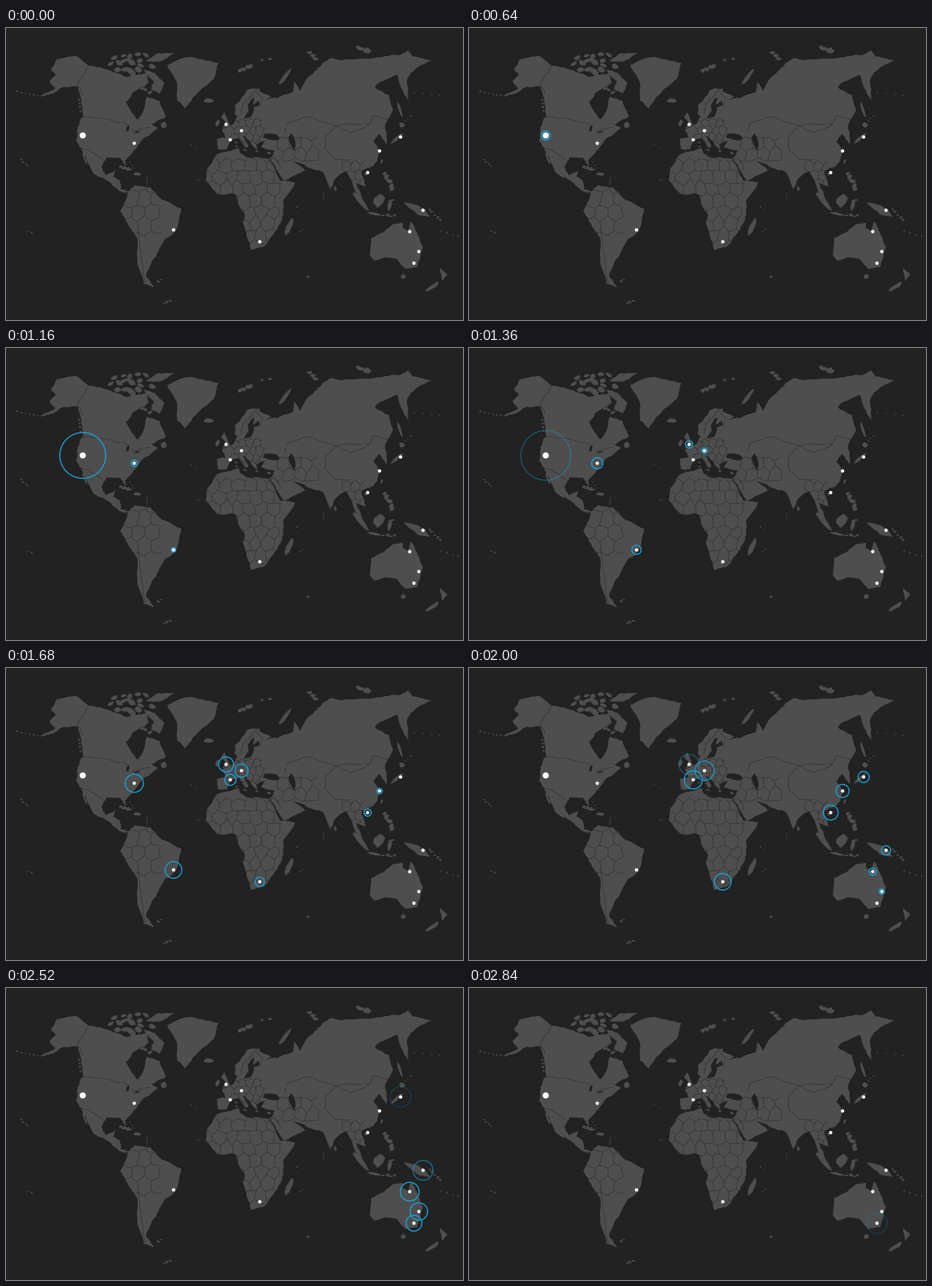
Animation of 652 by 418 pixels, one loop 2880 ms. Source, as a matplotlib script:

```python
import numpy as np
import matplotlib.pyplot as plt
from matplotlib.animation import FuncAnimation
from matplotlib.collections import LineCollection, PolyCollection
from matplotlib.patches import Circle

W, H, DPI = 652, 418, 64
STEP, FRAMES = 40, 72
PX = 72 / DPI
SEA, LAND, BLUE = "#222222", "#4e4e4e", "#12a5dc"

rng = np.random.default_rng(4)
lands, waters, borders = [], [], []


def rough(xy, closed=True, depth=3):
    """Midpoint displacement: turns a few key points into a coastline."""
    pts = np.reshape(xy, (-1, 2)).astype(float)
    if closed:
        pts = np.vstack([pts, pts[:1]])
    for _ in range(depth):
        d = np.diff(pts, axis=0)
        size = np.minimum(0.09 * np.hypot(*d.T), 1.2)
        mid = pts[:-1] + d / 2 + size[:, None] * rng.uniform(-1, 1, d.shape)
        out = np.empty((len(pts) + len(mid), 2))
        out[::2], out[1::2] = pts, mid
        pts = out
    return pts


def land(*xy):
    lands.append(rough(xy))


def border(*xy):
    borders.append(rough(xy, closed=False))


def blob(x, y, w, h, tilt=0):
    a = np.linspace(0, 2 * np.pi, 11)[:-1]
    r = rng.uniform(0.8, 1.15, 10) / 2
    u, v = w * r * np.cos(a), h * r * np.sin(a)
    c, s = np.cos(np.radians(tilt)), np.sin(np.radians(tilt))
    return np.column_stack([x + u * c - v * s, y + u * s + v * c])


def island(*shape):
    lands.append(blob(*shape))


def lake(*shape):
    waters.append(blob(*shape))


def chain(x0, y0, x1, y1, n, size):
    """A row of n small islands between two points."""
    for x, y in np.linspace((x0, y0), (x1, y1), n):
        w, h = size * rng.uniform([0.8, 0.45], [1.3, 0.8])
        dx, dy = rng.uniform(-0.2, 0.2, 2) * size
        island(x + dx, y + dy, w, h, rng.uniform(-40, 40))


def mesh(x0, y0, x1, y1, step):
    """Uneven honeycomb of borders; over the sea it cannot be seen."""
    x, y = np.meshgrid(np.arange(x0, x1, step / 2), np.arange(y0, y1, step))
    rows, cols = x.shape
    r, c = np.indices(x.shape)
    x = x + rng.uniform(-0.15, 0.15, x.shape) * step
    y = y + (0.16 * (-1.0) ** (r + c) + rng.uniform(-0.2, 0.2, x.shape)) * step
    for i in range(rows):
        border(*np.column_stack([x[i], y[i]]).ravel())
        if i + 1 < rows:
            for j in range(i % 2, cols, 2):
                border(x[i, j], y[i, j], x[i + 1, j], y[i + 1, j])


# North America
land(64, 60, 72, 45, 100, 40, 118, 54, 146, 60, 172, 70, 200, 64, 204, 78,
     180, 93, 171, 106, 187, 131, 196, 118, 201, 98, 219, 104, 228, 127,
     208, 138, 217, 143, 196, 158, 181, 177, 170, 190, 171, 199, 163, 186,
     144, 185, 136, 199, 143, 211, 156, 204, 153, 213, 162, 218, 164, 231,
     177, 234, 168, 236, 147, 220, 126, 209, 110, 178, 100, 160, 102, 142,
     110, 126, 107, 100, 103, 84, 82, 84, 66, 94, 48, 98, 70, 87, 62, 76,
     71, 66)
land(230, 53, 258, 42, 303, 50, 297, 72, 268, 98, 256, 115, 244, 104, 243, 76)
land(196, 60, 212, 64, 226, 78, 219, 94, 207, 88, 211, 77)
land(200, 47, 216, 36, 241, 36, 220, 48)
island(112, 186, 3, 18, -20)
island(225, 139, 9, 9)
island(289, 104, 14, 7)
chain(149, 50, 190, 46, 5, 11)
chain(160, 60, 190, 60, 4, 13)
chain(156, 42, 198, 38, 5, 9)
chain(194, 54, 208, 54, 2, 11)
chain(194, 86, 205, 93, 3, 6)
chain(104, 102, 107, 119, 4, 4)
chain(16, 91, 46, 97, 6, 3)
chain(22, 189, 31, 198, 4, 3)
chain(163, 198, 177, 204, 4, 6)
island(187, 209, 11, 5, 5)
chain(177, 192, 182, 200, 3, 2.5)
chain(202, 212, 201, 225, 5, 2.5)

# South America
land(173, 236, 185, 225, 206, 228, 223, 246, 250, 259, 242, 291, 228, 301,
     216, 322, 209, 332, 200, 356, 211, 371, 197, 367, 188, 340, 187, 300,
     176, 285, 163, 262)
chain(217, 363, 221, 361, 2, 4)
chain(226, 394, 234, 390, 3, 4)

# Europe and Siberia
land(360, 90, 378, 98, 370, 104, 388, 100, 410, 90, 411, 77, 420, 90, 428, 74,
     440, 62, 452, 50, 464, 43, 480, 46, 510, 44, 545, 40, 564, 38, 573, 32,
     580, 41, 607, 46, 592, 53, 577, 64, 572, 74, 574, 104, 563, 84, 558, 67,
     534, 77, 526, 85, 546, 96, 552, 116, 541, 138, 520, 160, 400, 160,
     368, 162, 357, 167, 358, 174, 352, 169, 342, 156, 337, 154, 346, 168,
     343, 172, 332, 157, 321, 160, 315, 174, 302, 173, 301, 158, 313, 157,
     308, 145, 325, 137, 333, 123, 337, 131, 350, 127, 354, 113, 362, 110)
land(326, 122, 327, 110, 345, 88, 362, 87, 364, 101, 352, 110, 354, 99,
     345, 110, 346, 119, 338, 131, 328, 125)
land(309, 143, 313, 135, 307, 127, 312, 121, 320, 140)
island(302, 136, 6, 10, 15)
island(398, 70, 28, 6, -55)
island(562, 117, 4, 27, -20)
chain(334, 61, 350, 54, 4, 8)
chain(366, 46, 376, 45, 2, 6)
chain(433, 36, 440, 43, 3, 8)
chain(503, 30, 518, 34, 4, 9)
chain(329, 164, 329, 169, 2, 4)
chain(340, 174, 376, 179, 3, 5)
chain(264, 167, 272, 172, 3, 2)

# Southern Asia
land(364, 171, 368, 163, 400, 145, 530, 135, 541, 138, 543, 166, 532, 152,
     524, 163, 533, 178, 525, 196, 507, 206, 513, 227, 499, 222, 511, 250,
     499, 240, 492, 216, 485, 205, 470, 215, 463, 231, 452, 206, 428, 198,
     405, 185, 427, 204, 397, 219, 376, 187, 384, 175)
island(558, 158, 23, 5, -42)
island(565, 139, 8, 7)
island(536, 191, 3, 6, 20)
island(513, 209, 5, 4)
island(470, 230, 4, 7, -15)
chain(570, 133, 577, 126, 3, 2.5)
chain(583, 93, 619, 96, 4, 2.5)
chain(453, 236, 453, 244, 3, 2)
lake(379, 156, 28, 9, 10)
lake(409, 163, 9, 24, -15)
lake(174, 144, 4, 10, 10)
lake(187, 149, 9, 2.5, -15)

# Africa
land(301, 181, 332, 172, 335, 180, 350, 186, 375, 187, 391, 219, 413, 221,
     395, 249, 394, 274, 383, 293, 368, 313, 350, 318, 338, 278, 341, 268,
     331, 250, 328, 238, 302, 238, 285, 217, 288, 200)
island(404, 285, 8, 26, 20)
chain(273, 217, 276, 219, 2, 2.5)
chain(416, 256, 422, 258, 2, 2.5)
chain(419, 291, 423, 289, 2, 2.5)
island(431, 356, 5, 3, 20)

# Islands of the south east, Australia, New Zealand
island(506, 248, 34, 7, 50)
island(525, 266, 21, 4, 10)
island(532, 247, 15, 21, 25)
island(547, 254, 6, 16, 10)
island(550, 247, 10, 3, -10)
land(567, 250, 580, 252, 597, 259, 605, 271, 589, 268, 577, 259)
chain(542, 207, 552, 230, 6, 8)
chain(539, 268, 554, 269, 4, 5)
chain(604, 259, 619, 275, 5, 4)
chain(621, 291, 646, 298, 4, 3)
chain(32, 291, 37, 293, 2, 3)
land(519, 326, 521, 301, 537, 293, 552, 281, 566, 279, 566, 286, 574, 290,
     578, 277, 587, 295, 595, 314, 587, 342, 570, 345, 558, 331, 540, 328,
     525, 333)
island(567, 356, 8, 7)
land(619, 343, 630, 353, 622, 363, 621, 354)
island(609, 370, 24, 6, -35)

# Borders: long ones by key points, crowded regions by rule
border(118, 54, 102, 80, 109, 96)
border(110, 127, 150, 132, 173, 139)
border(180, 148, 206, 142)
border(104, 172, 118, 174, 138, 190)
border(189, 288, 191, 318, 199, 366)
border(335, 123, 337, 109, 357, 89, 366, 100, 362, 111)
border(398, 150, 400, 137, 432, 127, 470, 140, 492, 150, 518, 138, 524, 125,
       546, 132)
border(470, 140, 490, 137, 518, 138)
border(470, 140, 455, 156, 455, 172, 470, 188, 492, 189)
mesh(168, 234, 222, 305, 20)
mesh(288, 188, 396, 312, 17)
mesh(322, 132, 368, 170, 10)
mesh(386, 156, 452, 200, 17)
mesh(478, 192, 512, 232, 13)

HUB = (109.5, 153.8)
CITIES = [(183, 165), (239, 289), (314, 138), (336, 147), (320, 160),
          (362, 306), (516, 207), (533, 176), (563, 156), (595, 261),
          (576, 291.5), (589, 320), (582, 336.7)]

fig = plt.figure(figsize=(W / DPI, H / DPI), dpi=DPI, facecolor=SEA)
ax = fig.add_axes([0, 0, 1, 1])
ax.set_xlim(0, W)
ax.set_ylim(H, 0)
ax.axis("off")
ax.add_collection(PolyCollection(lands, facecolors=LAND, linewidths=0, zorder=1))
ax.add_collection(LineCollection(borders, colors=SEA, linewidths=0.5 * PX,
                                 zorder=2))
ax.add_collection(PolyCollection(waters, facecolors=SEA, linewidths=0, zorder=3))

rings = []
for i, spot in enumerate([HUB] + CITIES):
    ring = Circle(spot, 1, fill=False, ec=BLUE, lw=1.5 * PX, zorder=4)
    ax.add_patch(ring)
    rings.append(ring)
    ax.add_patch(Circle(spot, 2.4 if i else 4.4, fc="white", lw=0, zorder=5))


def hub_wave(t):
    u = np.clip((t - 560) / 840, 0, 1)
    return 35.7 * (1 - (1 - u) ** 2), 1 - (t - 1240) / 200


def city_wave(t, i):
    age = t - 1040 - 80 * i
    u = np.clip(0.28 + 0.00075 * age, 0, 1)
    return 7.5 * (1 - np.cos(np.pi * u)), 1 - (age - 680) / 200


def update(frame):
    t = frame * STEP
    waves = [hub_wave(t)] + [city_wave(t, i) for i in range(len(CITIES))]
    for i, (ring, (radius, alpha)) in enumerate(zip(rings, waves)):
        ring.set_radius(radius)
        ring.set_alpha(float(np.clip(alpha, 0, 1)))
        ring.set_visible(bool(radius > (2.8 if i else 5) and alpha > 0))
    return rings


anim = FuncAnimation(fig, update, frames=FRAMES, interval=STEP, repeat=True,
                     repeat_delay=0, blit=False)
plt.show()
```
